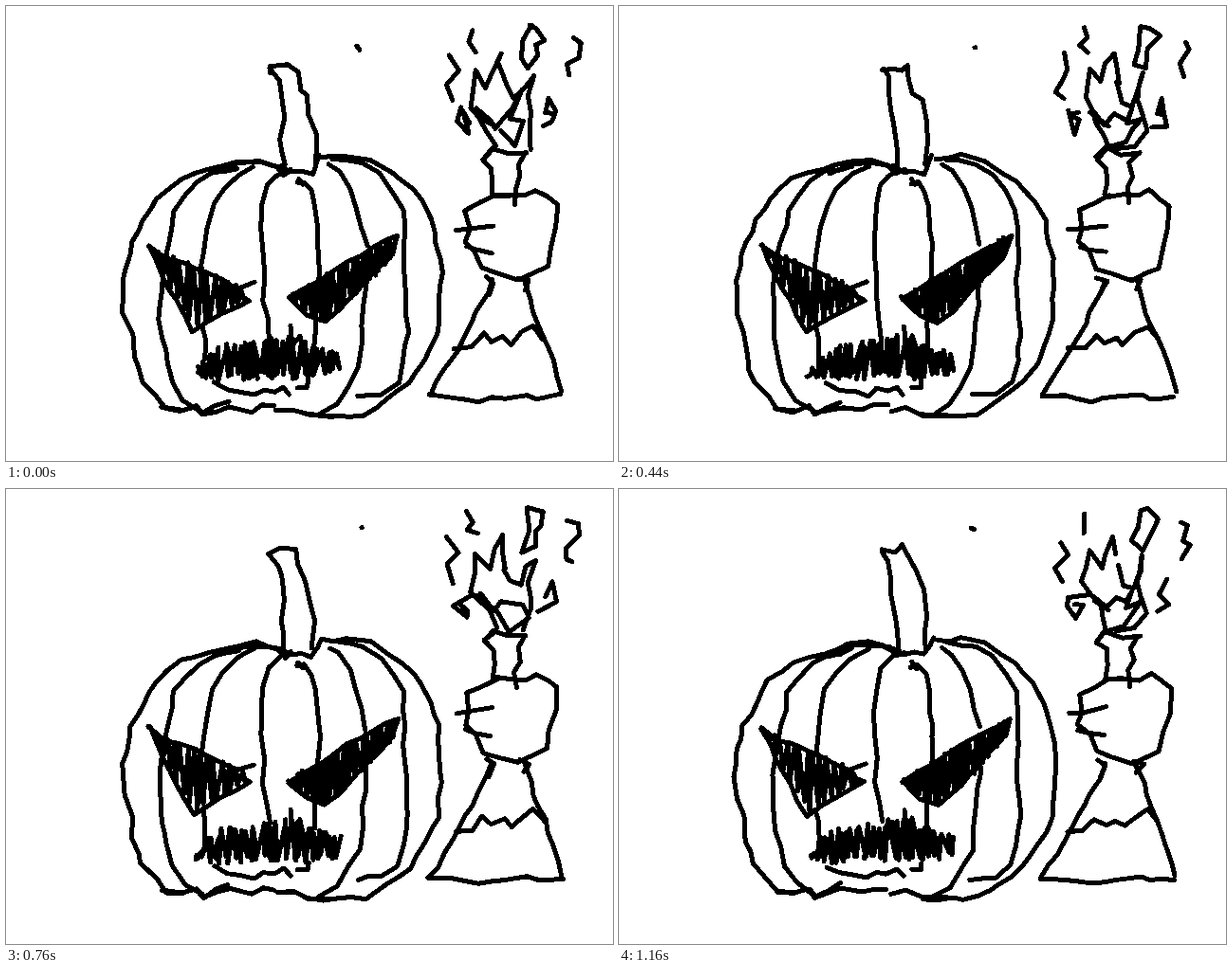
Recreate the animation shown at these times as an HTML page with a canvas. Size 640x480 px, loop 1.18 s.

```html
<!DOCTYPE html>
<html lang="en">
<head>
<meta charset="utf-8">
<title>Pumpkin and candle</title>
<style>
html, body { margin: 0; width: 100%; height: 100%; overflow: hidden; background: #fff; }
canvas { display: block; width: 640px; height: 480px; }
</style>
</head>
<body>
<canvas width="640" height="480"></canvas>
<script>
const ctx = document.querySelector('canvas').getContext('2d', { willReadFrequently: true });
const TICK = 20, TICKS = 59, CYCLE = 14;
const parts = [];

const points = text => text.split(' ').map(p => p.split(',').map(Number));

// Each part is redrawn once per cycle, first at tick `start`; variants take turns.
function line(start, wobble, ...variants) {
  parts.push({ start, wobble, variants: variants.map(points) });
}

function hatch(start, wobble, count, top, bottom) {
  parts.push({ start, wobble, count, top: points(top), bottom: points(bottom) });
}

// Pumpkin outline
line(11, 2.2, '292,171 265,163 242,165 215,172 183,181 158,203 146,226 132,250 126,275 123,305 124,325 132,345 134,370 142,395 158,412 168,424 185,428');
line(12, 2.2, '333,160 360,158 385,163 405,175 420,185 438,205 449,225 455,250 459,280 458,310 455,345 443,375 425,398 400,418 378,431 350,433 318,431');
line(13, 2, '165,424 185,427 200,423 208,430 220,424 234,417');
line(11, 2, '200,423 208,430 235,423 258,427 270,421 283,422');
line(12, 2, '286,427 303,425 320,431 345,432');
line(13, 2, '222,175 245,166 268,164 285,168 293,178 300,171');

// Ribs
line(6, 2, '245,170 218,175 203,184 190,200 178,215 176,232 170,250 165,275 163,300 162,330 164,350 170,375 175,398 188,416 207,428');
line(9, 2, '262,168 245,178 230,195 218,210 213,235 209,260 206,280');
line(9, 1.5, '207,338 211,350 210,372');
line(7, 1.6, '292,174 284,180 276,190 271,210 269,235 270,260 272,285 271,310 275,330 277,352');
line(7, 1.4, '308,187 315,185 323,195 327,212 328,235 331,262 330,285 326,300 326,335 325,358');
line(8, 1.8, '340,167 352,174 362,192 370,210 376,232 380,252');
line(8, 1.8, '380,262 380,300 376,335 375,355 372,380 362,400 348,420 330,431');
line(12, 1.8, '345,162 375,166 395,177 408,195 419,215 420,250 420,290 424,345 420,375 413,398 397,409 371,411');

// Stem
line(2, 1.5, '278,67 287,80 290,92 293,118 290,140 293,168', '280,70 286,88 291,95 291,125 291,168', '278,67 284,75 286,110 291,140 294,170');
line(2, 1.5, '278,72 278,63 296,62 307,68 312,88 318,95 319,115 327,135 327,165', '280,72 278,63 290,68 298,60 312,85 322,105 324,135 322,168', '278,67 290,66 298,68 305,63 308,92 320,100 325,125 323,165', '278,67 287,62 305,64 307,78 315,98 321,120 326,138 323,168');
line(3, 2, '290,170 300,175 312,174 322,176 327,167 331,158');
line(6, 1, '308,183 313,189');

// Face
const eyeL = ['155,257 188,271 214,282 252,301', '155,257 172,295 200,340 228,322 257,308'];
const eyeR = ['299,308 330,290 358,272 411,243', '299,308 318,324 335,333 378,294 407,262'];
hatch(11, 2, 27, ...eyeL);
hatch(12, 2, 44, ...eyeR);
line(11, 1.5, '151,252 168,266 185,270 213,281 242,298 261,291');
line(11, 1.5, '151,252 165,285 180,310 197,345 228,325 258,310 240,302');
line(13, 1.5, '299,308 330,290 360,270 413,242 405,264 380,290 352,322 336,334 318,326 299,309');
hatch(1, 4, 70, '199,390 213,370 230,361 270,356 300,350 322,359 352,370', '199,390 225,392 270,389 310,391 352,385');
line(4, 1.5, '300,338 302,360 310,348 316,380');
line(2, 1.5, '219,398 232,405 248,407 262,411 272,404 282,407 292,401 300,409');
line(2, 1, '308,402 318,402 319,394');

// Stray dot
line(5, .4, '370,42 373,46', '371,41 371,44', '375,44 376,44', '375,41 375,41', '371,41 374,43');

// Cone and its jagged band
line(3, 2, '511,290 508,303 497,322 485,345 475,365 462,385 446,411');
line(3, 1.8, '446,411 470,412 498,416 525,413 550,410 560,414 586,411');
line(4, 1.8, '546,290 553,310 560,335 568,350 577,375 587,408');
line(8, 2, '474,362 490,360 503,347 512,355 525,349 532,357 545,345 556,338 567,352');
line(6, 2, '505,285 513,291 508,303');
line(6, 2, '541,287 552,289 547,300');

// Hand
line(7, 2, '516,200 500,208 485,215 488,235 484,248 495,260 503,277 520,283 540,288 555,282 570,275 574,255 580,235 581,211 572,203 560,195 548,201 530,199 516,200');
line(6, 1.5, '474,237 490,235 513,231');
line(5, 1.5, '485,255 495,258 512,260');

// Candle
line(3, 1.8, '513,151 504,161 513,170 514,185 513,199');
line(5, 1.8, '548,155 539,167 542,181 537,192 538,209');
line(13, 1.5, '504,160 512,150 530,156 549,155');

// Flame
line(13, 1.8,
  '515,147 497,118 491,108 496,68 505,86 514,70 522,49',
  '517,147 503,125 493,95 498,67 508,80 512,60 521,51 526,80',
  '516,146 508,128 491,107 496,68 509,84 515,65 522,49 526,85',
  '512,148 510,125 495,112 496,66 509,84 513,58 522,52',
  '514,148 508,122 489,98 498,66 508,84 519,52 524,68');
line(14, 1.8,
  '517,58 524,70 527,84 535,98 545,88 556,75 552,95 552,150',
  '525,80 530,102 542,105 552,70 547,98 556,130 545,148 525,150',
  '525,84 532,98 542,102 548,82 557,77 549,99 555,125 545,148');
line(14, 1.8,
  '495,108 510,122 515,128 534,108 544,88 530,118 546,122 535,146 520,130',
  '500,112 513,124 524,115 535,120 542,108 535,125 550,118 533,143 516,148',
  '500,110 515,130 520,118 545,122 550,135 530,150 518,128');
line(14, 1, '497,112 516,127 502,119');

// Smoke and sparks
line(4, 1, '467,51 477,68 464,84 470,99', '465,55 477,66 463,80 464,96', '470,50 472,66 461,90 470,97', '464,51 477,68 465,80 471,99', '466,56 473,70 460,84 468,97', '471,49 467,66 460,84 471,100');
line(8, 1, '491,25 488,38 496,48', '490,21 492,34 486,42 493,50', '490,23 493,34 486,42 495,50', '486,24 492,36 486,44 497,46', '490,26 491,47');
line(12, 1.2,
  '553,20 545,35 544,54 551,66 560,52 558,42 568,36 560,24 553,20',
  '550,22 547,45 544,62 555,66 558,46 570,32 560,24 550,22',
  '549,20 566,24 564,38 558,44 560,60 545,66 552,44 549,20',
  '553,21 543,36 543,58 553,65 555,50 568,38 562,24 553,21',
  '550,24 548,40 541,54 552,65 568,32 558,20 550,24');
line(8, 1, '599,34 606,40 604,54 592,61 593,72', '592,36 604,43 602,54 589,66 593,75', '597,38 602,46 592,60 595,75', '592,34 603,36 604,48 591,62 590,74 597,76', '593,36 599,38 595,55 603,60 594,73');
line(7, 1, '566,126 575,123 579,110 573,97 568,112 575,114', '557,130 574,125 576,100 567,115', '562,129 577,128 572,98 567,114 575,115', '561,129 580,120 575,98 568,113', '567,130 579,122 570,111 577,95');
line(13, 1, '480,107 476,122 487,134 481,110 489,123', '474,111 480,135 485,120 475,114 484,113', '490,112 472,123 485,135 487,128 479,121', '485,113 475,114 476,126 486,133 480,116', '495,112 474,114 473,124 482,136 489,122 480,122');

function randomFrom(seed) {
  let s = Math.imul(seed + 1, 2654435761) >>> 0;
  return () => {
    s = (s + 0x6D2B79F5) >>> 0;
    let r = Math.imul(s ^ (s >>> 15), s | 1);
    r ^= r + Math.imul(r ^ (r >>> 7), r | 61);
    return ((r ^ (r >>> 14)) >>> 0) / 4294967296;
  };
}

const mix = (a, b, f) => [a[0] + (b[0] - a[0]) * f, a[1] + (b[1] - a[1]) * f];
const distance = (a, b) => Math.hypot(b[0] - a[0], b[1] - a[1]);

function subdivide(path) {
  const result = [path[0]];
  for (let i = 1; i < path.length; i++) {
    const n = Math.max(1, Math.round(distance(path[i - 1], path[i]) / 17));
    for (let k = 1; k <= n; k++) result.push(mix(path[i - 1], path[i], k / n));
  }
  return result;
}

// The point of a left-to-right edge at the given x
function edgeAt(edge, x) {
  let i = 1;
  while (i < edge.length - 1 && edge[i][0] < x) i++;
  const [a, b] = [edge[i - 1], edge[i]];
  return mix(a, b, Math.min(1, (x - a[0]) / (b[0] - a[0])));
}

function hatchPath({ count, top, bottom }) {
  const left = top[0][0], right = top[top.length - 1][0];
  return Array.from({ length: count + 1 }, (_, i) =>
    edgeAt(i % 2 ? bottom : top, left + (right - left) * i / count));
}

function drawPart(part, index, tick) {
  const step = Math.floor((tick - part.start) / CYCLE) + 1;
  const random = randomFrom(index * 16 + step);
  const path = part.count
    ? hatchPath(part)
    : subdivide(part.variants[step % part.variants.length]);
  const shake = () => (random() * 2 - 1) * part.wobble;
  ctx.beginPath();
  for (const [x, y] of path) ctx.lineTo(x + shake(), y + shake());
  ctx.stroke();
}

// Hard pixel edges, as from a plain brush
function sharpen() {
  const image = ctx.getImageData(0, 0, 640, 480);
  const pixels = new Uint32Array(image.data.buffer);
  for (let i = 0; i < pixels.length; i++) {
    pixels[i] = (pixels[i] & 255) < 128 ? 0xff000000 : 0xffffffff;
  }
  ctx.putImageData(image, 0, 0);
}

function draw(tick) {
  ctx.fillStyle = '#fff';
  ctx.fillRect(0, 0, 640, 480);
  ctx.strokeStyle = '#000';
  ctx.lineWidth = 5;
  ctx.lineCap = ctx.lineJoin = 'round';
  parts.forEach((part, i) => drawPart(part, i, tick));
  sharpen();
}

const began = performance.now();
let shown = -1;
function play() {
  const tick = Math.floor((performance.now() - began) / TICK) % TICKS;
  if (tick !== shown) draw(shown = tick);
  requestAnimationFrame(play);
}
play();
</script>
</body>
</html>
```
